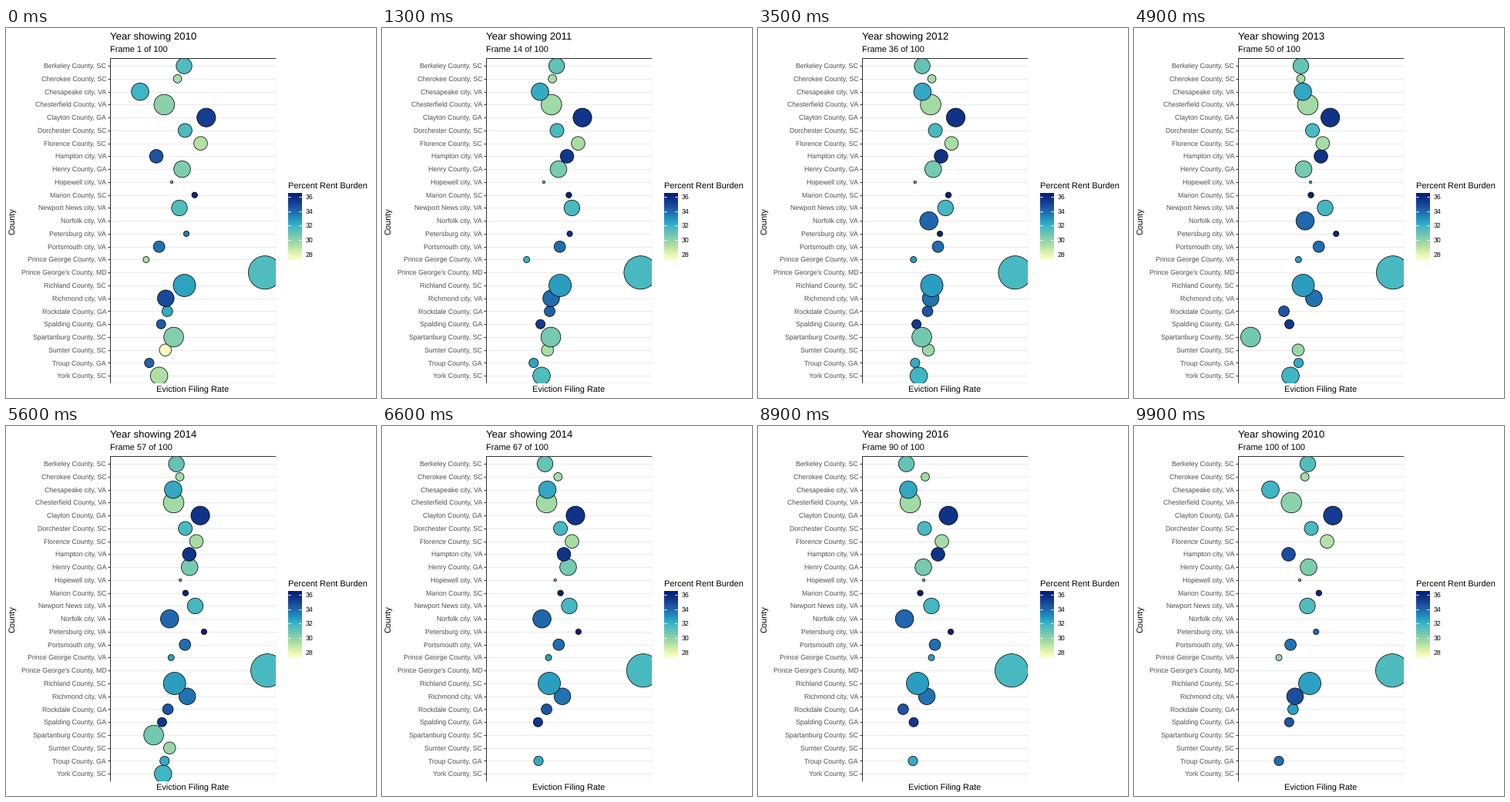
Recreate the animation shown at these times as a matplotlib script. Size 480x480 px, loop 10 s.

```python
import matplotlib.pyplot as plt
import numpy as np
from matplotlib.animation import FuncAnimation
from matplotlib.colors import LinearSegmentedColormap
from matplotlib.patches import Circle, Rectangle

plt.rcParams["font.family"] = "Liberation Sans"
plt.rcParams["text.hinting"] = "none"

SIZE, DPI = 480, 72
FRAMES, INTERVAL = 100, 100
LEFT, RIGHT, TOP, BOTTOM = 135.0, 349.6, 39.1, 461.3
ROWS = 25
STEP = (BOTTOM - TOP) / (ROWS + 0.2)
YEARS = range(2010, 2017)
GREY = "#333333"

# Each year holds, then moves on to the next; the last one wraps round.
KEYS = [0, 7, 14, 21, 29, 36, 43, 50, 58, 65, 72, 79, 86, 93, 100]

CMAP = LinearSegmentedColormap.from_list("burden", [
    "#ffffc8", "#d9f0a8", "#a1daa5", "#70c8b0", "#41b6c4",
    "#1d91c0", "#225ea8", "#12398e", "#081d6e"])

fig = plt.figure(figsize=(SIZE / DPI, SIZE / DPI), dpi=DPI, facecolor="white")
ax = fig.add_axes([0, 0, 1, 1])
ax.axis("off")

panel = Rectangle((LEFT, TOP), RIGHT - LEFT, BOTTOM - TOP, fill=False,
                  ec=GREY, lw=1.07, zorder=50)
ax.add_patch(panel)
panel.set_clip_path(panel)


def label(x, y, text, size, color="black", **kw):
    return ax.text(x, y, text, fontsize=size, color=color, **kw)


def line(x0, x1, y, color, lw=1.07, z=1):
    ax.plot([x0, x1], [y, y], color=color, lw=lw, zorder=z,
            solid_capstyle="butt")


bubbles = []


def county(name, radius, shade_first, shade_later, *rates):
    """Add a row; rates are the x positions per year, None when missing."""
    row = len(bubbles)
    y = TOP + STEP * (row + 0.6)
    line(LEFT, RIGHT, y, "#ebebeb")
    line(LEFT - 2.75, LEFT, y, GREY)
    label(130.1, y + 3.15, name, 8.8, "#4d4d4d", ha="right")
    dot = Circle((LEFT, y), radius, ec="black", lw=0.75, zorder=40 - row)
    ax.add_patch(dot)
    dot.set_clip_path(panel)
    shades = [shade_first] + [shade_later] * 6
    bubbles.append((dot, y, rates, shades))


county("Berkeley County, SC", 10.2, .46, .41, 231, 225.8, 213, 216.5, 222.6, 145, 192.5)
county("Cherokee County, SC", 5.4, .24, .25, 222.5, 220.8, 225.5, 216.5, 228.5, 227.3, 217)
county("Chesapeake city, VA", 11.3, .50, .55, 174, 210.2, 213.3, 219, 216.2, 204.5, 195)
county("Chesterfield County, VA", 13.3, .31, .25, 205.3, 222.2, 224, 225.5, 214.8, 206, 197.5)
county("Clayton County, GA", 12.1, .86, .90, 259.8, 260, 256.5, 254.6, 251.2, 249.7, 247)
county("Dorchester County, SC", 9, .47, .48, 232.3, 226.1, 230, 231.5, 233, 222.8, 216)
county("Florence County, SC", 8.8, .21, .24, 252.5, 254.8, 251, 244.8, 247.7, 239, 238.5)
county("Hampton city, VA", 8.8, .79, .90, 195, 247.5, 237.5, 242.5, 236.2, 234.7, 233.5)
county("Henry County, GA", 10.8, .34, .36, 228.5, 229, 227.3, 220, 244.3, 224.5, 214.5)
county("Hopewell city, VA", 1.7, .42, .40, 215, 209, 203.7, 229, 225.3, 221, 215)
county("Marion County, SC", 3.7, .96, .98, 244.7, 242, 247, 229.5, 234, 216.8, 210.5)
county("Newport News city, VA", 10.2, .45, .49, 225, 249.9, 243.3, 248, 244.6, 233.3, 225)
county("Norfolk city, VA", 11.8, .73, .73, None, 224, 221.7, 222, 209, 198.6, 190)
county("Petersburg city, VA", 3.6, .68, .97, 234, 245.1, 236, 262.2, 255.1, 253, 250)
county("Portsmouth city, VA", 7.4, .70, .71, 198.6, 236, 233.5, 239.7, 229.7, 227, 229.5)
county("Prince George County, VA", 4, .23, .58, 181.8, 188.6, 201.7, 213.4, 214.5, 225, 225)
county("Prince George's County, MD", 21.6, .46, .48, 336, 335.4, 333.5, 336, 340.2, 331, 329)
county("Richland County, SC", 14.5, .57, .58, 231.5, 231, 225.5, 219.5, 218.4, 208.7, 207)
county("Richmond city, VA", 10.8, .82, .70, 207.3, 221.5, 224, 233.4, 235.8, 223.3, 219)
county("Rockdale County, GA", 6.9, .54, .78, 209.3, 218.9, 220, 194.5, 215.2, 203.5, 188.3)
county("Spalding County, GA", 6, .76, .89, 201.2, 206.3, 205.6, 201.5, 202.7, 200.3, 202)
county("Spartanburg County, SC", 12.8, .33, .37, 217.5, 219.3, 212.5, 151.3, 205, None, None)
county("Sumter County, SC", 7.8, .02, .27, 206.8, 216.1, 221, 213, 212, None, None)
county("Troup County, GA", 6.1, .74, .54, 185.8, 198.6, 203.8, 213.5, 203.2, 202, 201)
county("York County, SC", 11.3, .22, .50, 198.6, 208.4, 208.5, 203, 204, None, None)

title = label(135, 15.2, "", 13.2)
subtitle = label(135, 32, "", 11)
label((LEFT + RIGHT) / 2, 473, "Eviction Filing Rate", 11, ha="center")
label(13.6, 250.2, "County", 11, rotation=90, ha="right", va="center")

# Colour bar
BAR_L, BAR_R, BAR_T, BAR_B = 366, 383.3, 214.8, 301.2
label(366, 209, "Percent Rent Burden", 11)
ax.imshow(np.linspace(1, 0, 256)[:, None], cmap=CMAP, vmin=0, vmax=1,
          extent=(BAR_L, BAR_R, BAR_B, BAR_T), aspect="auto", zorder=2)
for k, value in enumerate(range(36, 27, -2)):
    y = 218.8 + 18.7 * k
    line(BAR_L, BAR_L + 3.46, y, "white", z=3)
    line(BAR_R - 3.46, BAR_R, y, "white", z=3)
    label(388.8, y + 3.2, str(value), 8.8)

ax.set_xlim(0, SIZE)
ax.set_ylim(SIZE, 0)


def phase(i):
    """Year index, next year index and progress between them."""
    j = int(np.searchsorted(KEYS, i, side="right")) - 1
    now = j // 2
    if j % 2 == 0:
        return now, now, 0.0
    return now, (now + 1) % 7, (i - KEYS[j]) / (KEYS[j + 1] - KEYS[j])


def draw(i):
    now, then, p = phase(i)
    for dot, y, rates, shades in bubbles:
        a, b = rates[now], rates[then if p else now]
        shown = a is not None and b is not None
        dot.set_visible(shown)
        if shown:
            dot.center = (a + (b - a) * p, y)
            dot.set_facecolor(CMAP(shades[now] + (shades[then] - shades[now]) * p))
    passed = sum(i >= round(FRAMES * k / 7) - 1 for k in range(1, 8))
    title.set_text(f"Year showing {YEARS[passed % 7]}")
    subtitle.set_text(f"Frame {i + 1} of {FRAMES}")
    return []


anim = FuncAnimation(fig, draw, frames=FRAMES, interval=INTERVAL,
                     init_func=lambda: draw(0), repeat=True, repeat_delay=0)
plt.show()
```
